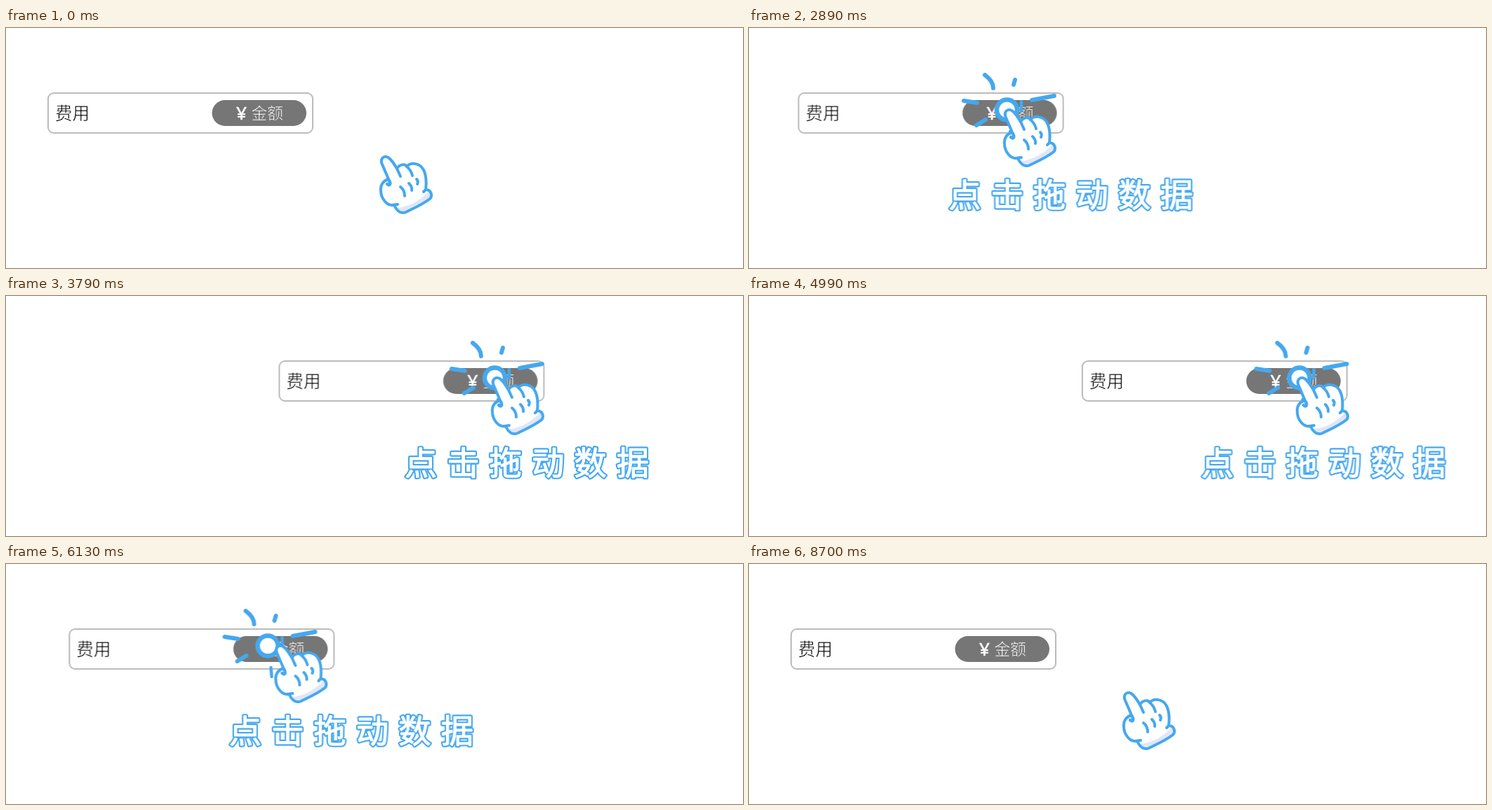
An HTML page without scripts for the animation above (8.8 s loop, 1050 by 343 pixels).

```html
<!DOCTYPE html>
<html lang="zh">
<head>
<meta charset="utf-8">
<title>点击拖动数据</title>
<style>
  html, body { margin: 0; width: 100%; height: 100%; overflow: hidden; background: #fff; }
  svg { display: block; width: 100%; height: 100%; }
  text { font-family: "Noto Sans CJK SC", "Noto Sans CJK", "Noto Sans", sans-serif; font-weight: 300; }
  .line { fill: none; stroke: #45a8ee; stroke-linecap: round; stroke-linejoin: round; }

  /* A stroke in the background colour slims the glyphs */
  .label { font-size: 24.5px; stroke: #fff; stroke-width: .6px; }
  .amount { font-size: 22.8px; fill: #fff; stroke: #767676; stroke-width: .6px; }
  .yen { font: 400 26px "Noto Sans", sans-serif; fill: #fff; stroke: #fff; stroke-width: .7px; }

  .hint text { font-size: 46px; font-weight: 400; letter-spacing: 14.4px; stroke-linejoin: round; }
  .rim { fill: #45a8ee; stroke: #45a8ee; stroke-width: 5.4px; }
  .face { fill: #fff; stroke: #fff; stroke-width: 1.2px; }

  /* Everything advances in 30 ms ticks */
  .card, .hand, .sparks, .hint { animation: 8.8s linear -3ms infinite; }
  .card { animation-name: card; }
  .hand { animation-name: hand; }
  .sparks { animation-name: sparks, show-sparks; }
  .hint { animation-name: hint, show-hint; }

  @keyframes card {
    0%, 32.5% { transform: none; animation-timing-function: steps(40); }
    46.1364%, 56.3636% { transform: translateX(425px); animation-timing-function: steps(42); }
    70.6818%, 100% { transform: none; }
  }
  @keyframes hand {
    0%, 4.2045% { transform: translate(0, 0); animation-timing-function: steps(25); }
    12.7273%, 32.5% { transform: translate(-181px, -67px); animation-timing-function: steps(40); }
    46.1364%, 56.3636% { transform: translate(257.5px, -67px); animation-timing-function: steps(42); }
    70.6818%, 92.3864% { transform: translate(-181px, -67px); animation-timing-function: steps(19); }
    98.8636%, 100% { transform: translate(0, 0); }
  }
  @keyframes sparks {
    0%, 32.5% { transform: translateX(0); animation-timing-function: steps(40); }
    46.1364%, 56.3636% { transform: translateX(438.5px); animation-timing-function: steps(42); }
    70.6818%, 100% { transform: translateX(-16px); }
  }
  @keyframes hint {
    0%, 32.5% { transform: translateX(0); animation-timing-function: steps(40); }
    46.1364%, 56.3636% { transform: translateX(378px); animation-timing-function: steps(42); }
    70.6818%, 100% { transform: translateX(17px); }
  }
  @keyframes show-sparks {
    0%, 18.0682% { opacity: 0; animation-timing-function: steps(10); }
    21.4773%, 80.2273% { opacity: 1; animation-timing-function: steps(17); }
    86.0227%, 100% { opacity: 0; }
  }
  @keyframes show-hint {
    0%, 23.1818% { opacity: 0; animation-timing-function: steps(5); }
    24.8864%, 80.2273% { opacity: 1; animation-timing-function: steps(17); }
    86.0227%, 100% { opacity: 0; }
  }
</style>
</head>
<body>
<svg viewBox="0 0 1050 343">
  <defs>
    <path id="palm" d="M545 216L536 195C532 186 540 180 547 187C552 192 554 196 557 201C561 194 569 194 571 198C577 191 590 193 595 203C599 211 599 222 598 231C606 231 608 240 604 244C594 252 580 258 570 263C563 266 557 262 553 253C543 255 534 244 534 232C533 224 538 218 545 216Z"/>
  </defs>

  <g class="card">
    <rect x="60" y="93" width="377" height="57" rx="8" fill="#fff" stroke="#bbb" stroke-width="2"/>
    <text class="label" x="70" y="131">费用</text>
    <rect x="293.5" y="103" width="134.5" height="37" rx="18.5" fill="#767676"/>
    <text class="yen" x="335.5" y="131" text-anchor="middle">¥</text>
    <text class="amount" x="349.5" y="130">金额</text>
  </g>

  <g class="hint">
    <text class="rim" x="275" y="255">点击拖动数据</text>
    <text class="face" x="275" y="255">点击拖动数据</text>
  </g>

  <g class="sparks line" stroke-width="6">
    <path d="M325 67Q337 76 337 86M368 74L366 81M392 103L424 97M295 104L314 107M313 139L326 131"/>
    <path d="M377 105V117M361 148L362 161" stroke-width="4.5"/>
    <circle cx="356.5" cy="117" r="14.5" fill="#fff" stroke-width="6.5"/>
  </g>

  <g class="hand">
    <use href="#palm" fill="#fff"/>
    <path fill="#e0e6fb" d="M557 257C575 256 592 245 603 233L605 242C594 252 580 258 570 262C563 264 560 262 557 257Z"/>
    <g class="line" stroke-width="4">
      <use href="#palm"/>
      <path d="M557 201L562 212M571 198Q577 203 579 211M585 216Q588 219 586 223M574 222Q579 227 578 232M562 227Q568 232 568 240M551 253L558 252M598 231L595 234"/>
      <path d="M546 218C549 224 546 226 543 223" stroke-width="4.5"/>
    </g>
  </g>
</svg>
</body>
</html>
```
